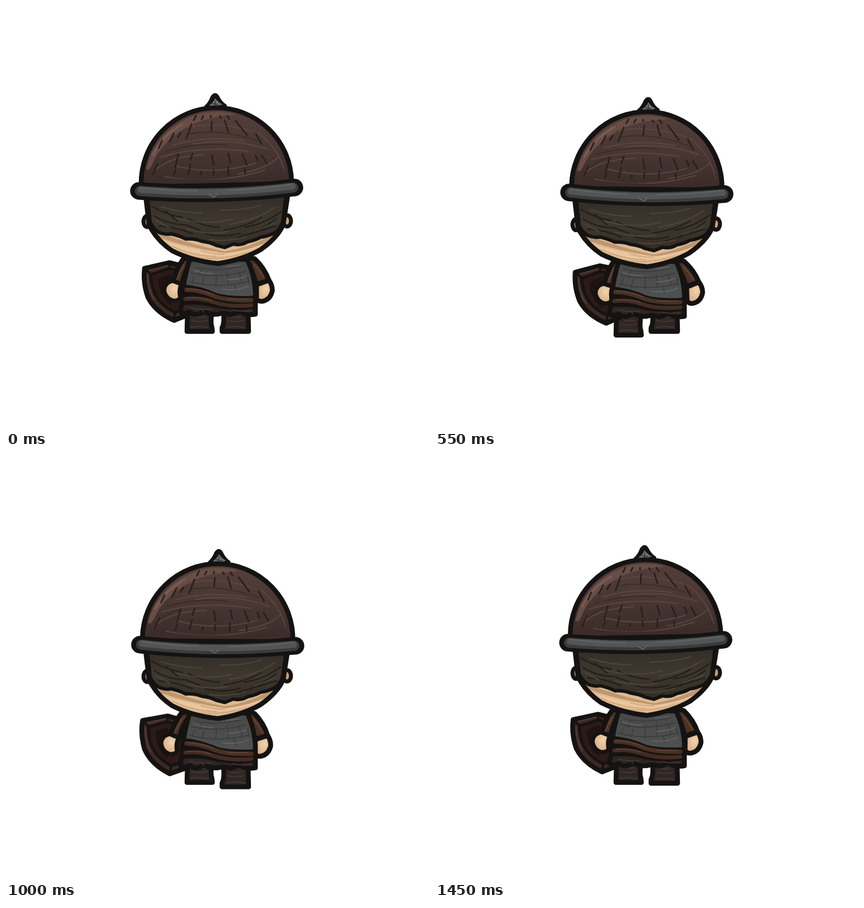
An HTML page for the animation above (1500 ms loop, 748x748 px).

```html
<!DOCTYPE html>
<html lang="en">
<head>
<meta charset="utf-8">
<title>Walking soldier, back view</title>
<style>
html, body { margin: 0; width: 100%; height: 100%; overflow: hidden; background: #fff; }
svg { display: block; width: 100vw; height: 100vh; }
.ink { stroke: #141312; stroke-width: 8.5; stroke-linejoin: round; stroke-linecap: round; }
.line { fill: none; stroke-linecap: round; stroke-linejoin: round; }
</style>
</head>
<body>
<svg viewBox="0 0 748 748">
<defs>
  <linearGradient id="leather" x2="0" y2="1">
    <stop stop-color="#553f3a"/><stop offset=".45" stop-color="#493733"/><stop offset="1" stop-color="#392b29"/>
  </linearGradient>
  <linearGradient id="steel" x2="0" y2="1">
    <stop stop-color="#484848"/><stop offset="1" stop-color="#505152"/>
  </linearGradient>
  <linearGradient id="hair" x2="0" y2="1">
    <stop stop-color="#302b26"/><stop offset=".5" stop-color="#3e372f"/><stop offset="1" stop-color="#332d26"/>
  </linearGradient>
  <radialGradient id="skin" cx=".6" cy=".4">
    <stop stop-color="#f2d3ae"/><stop offset="1" stop-color="#dbb28a"/>
  </radialGradient>
  <path id="dome" d="M239 320V315A133 133 0 0 1 505 311V314Z"/>
  <path id="skull" d="M247 336L253 387Q266 414 294 433Q330 451 375 455.500Q418 449 450 431Q480 410 490 387L499 330Z"/>
</defs>

<g id="leftLeg">
  <path class="ink" fill="#302725" d="M321 536L320 575.500H365L364 567Q361 560 365 536Z"/>
  <path class="line" stroke="#493a37" stroke-width="1.5" d="M328 556q14 4 28 0M327 568q16-3 30 1M335 550h18"/>
</g>
<g id="rightLeg">
  <path class="ink" fill="#302725" d="M384 536Q387 560 382 569V575.500H429L428 536Z"/>
  <path class="line" stroke="#493a37" stroke-width="1.5" d="M392 556q14 4 28 0M392 568q16-3 30 1M397 550h18"/>
</g>

<g id="leftArm">
  <path class="ink" fill="#3d2822" d="M245 464L289 454L322 462V546L297 556Q264 541 251 515Q242 490 245 464Z"/>
  <path class="line" stroke="#5a3c33" stroke-width="2" d="M251 468L286 459M250 476Q250 500 262 519"/>
  <path class="ink" style="stroke-width:5" fill="#2b1a18" d="M256 475L289 464L322 472V532L299 542Q271 528 262 506Q256 490 256 475Z"/>
  <path class="line" stroke="#141312" stroke-width="4" d="M246 464L257 475M289 454V464M299 542L297 555"/>
  <path fill="#20120f" d="M269 482L292 473V530Q270 514 269 482Z"/>
  <path class="ink" fill="#4a3125" d="M326 444L313 448Q302 463 296 486L311 493Q316 466 329 452Z"/>
  <path class="line" stroke="#654533" stroke-width="2" d="M314 458Q306 472 302 484"/>
  <path class="ink" style="stroke-width:7" fill="url(#skin)" d="M294 486Q279 490 280 504Q283 518 296 521Q306 521 308 515Q305 502 310 492Z"/>
</g>
<g id="rightArm">
  <path class="ink" fill="#4a3125" d="M424 444L440 447Q457 463 465 485L442 492Q437 467 424 454Z"/>
  <path class="line" stroke="#654533" stroke-width="2" d="M439 457Q450 470 456 481"/>
  <path class="ink" fill="url(#skin)" d="M443 493L465 485Q471 493 471 503Q468 519 454 522Q445 523 443 517Z"/>
</g>

<g id="body">
  <path class="ink" fill="#2e2523" d="M312 522L308 540Q313 546 325 541Q334 548 342 544L352 540Q359 546 374 545Q386 541 396 546Q407 543 414 540Q422 548 441 545V522Z"/>
  <path class="line" stroke="#443532" stroke-width="2" d="M324 533q20 5 38 3M348 537l1 4M402 538q16 3 30 1"/>
  <path class="ink" fill="url(#steel)" d="M325 448Q316 475 313 504L312 520H441V504Q438 470 426 448Z"/>
  <path class="line" stroke="#38393a" stroke-width="1.5" d="M328 472Q374 483 424 469M324 487Q374 501 430 487M334 462Q374 471 416 460M346 465l-4 11M372 476l-1 20M391 470l2 22M350 480l-3 14M412 470l5 18M333 478l-4 12M404 494l2 10M427 476l3 14"/>
  <path class="line" stroke="#666768" stroke-width="1.5" d="M332 467Q350 474 366 473M391 484Q412 484 426 477M383 501Q412 504 429 495M390 461l25-3"/>
  <path class="ink" style="stroke-width:4" fill="#141312" d="M312 494Q345 497 373 510Q400 517 441 514V533Q407 538 372 532Q346 524 311 527Z"/>
  <path class="line" stroke="#493024" stroke-width="7.5" d="M319 502Q344 502 370 514Q396 522 434 520"/>
  <path class="line" stroke="#422c22" stroke-width="7" d="M317 518Q344 515 368 524Q396 533 434 529"/>
  <path class="line" stroke="#654434" stroke-width="1.5" d="M320 500Q345 501 368 511M320 516Q344 514 364 521M392 518L428 518"/>
</g>

<g id="head">
  <g class="ink" style="stroke-width:7" fill="#c99b75">
    <ellipse cx="250" cy="381" rx="7" ry="10"/><ellipse cx="497" cy="380" rx="7" ry="10"/>
  </g>
  <use href="#skull" fill="#dfba91"/>
  <path fill="#eac79d" d="M282 417Q330 431 386 438Q430 434 468 413Q454 426 420 435Q375 450 330 437Q302 430 282 417Z"/>
  <path class="line" stroke="#cda179" stroke-width="1.5" d="M295 425Q330 442 372 443M325 443Q375 452 424 437M345 433Q365 439 386 439M420 430L448 422"/>
  <path fill="#bd9772" d="M264 398Q320 420 386 434Q432 428 480 399V409Q440 431 388 437Q320 427 270 409Z"/>
  <path class="ink" style="stroke-width:6" fill="url(#hair)" d="M250 336L255 383Q260 393 270 400Q282 405 292 403Q306 406 318 412Q333 411 346 416Q362 418 371 423L387 427L402 421Q416 424 427 417Q442 414 450 409Q464 407 477 400Q484 394 489 383L496 330Z"/>
  <path class="line" stroke="#231f1a" stroke-width="2.5" d="M258 354Q280 368 312 374M262 371Q285 386 318 387L342 396M270 389Q302 391 330 403M283 363L304 381M322 376Q352 391 378 391M352 402Q382 411 414 402M386 396Q425 390 452 374M408 410Q440 400 478 389M422 391Q456 386 486 364M432 404L458 389M452 394L478 376"/>
  <path class="line" stroke="#504738" stroke-width="1.8" d="M274 355Q310 366 346 366M300 375Q350 389 400 377M318 394Q360 406 392 399M396 386Q442 379 476 356M360 413Q390 418 424 408M440 398L474 384M266 380L290 393M380 361Q420 362 452 352"/>
  <use href="#skull" class="ink" fill="none"/>
</g>

<g id="helmet">
  <path class="ink" style="stroke-width:5" fill="#141312" d="M353 178Q360 172 364 161Q370 152 375 161Q380 171 388 176Z"/>
  <path fill="#6f7476" d="M370 163Q367 171 359 176Q371 179 383 174Q374 170 370 163Z"/>
  <path class="line" stroke="#303234" stroke-width="1.5" d="M370 168V176M365 173L376 174"/>
  <use href="#dome" fill="url(#leather)"/>
  <path fill="#674d45" d="M248 286Q266 216 340 191Q377 183 407 192Q342 196 306 223Q271 249 260 277Q252 296 248 286Z"/>
  <path class="line" stroke="#7b5e53" stroke-width="3" d="M260 263Q277 229 312 209"/>
  <path class="line" stroke="#5b4640" stroke-width="2" d="M315 216Q372 202 436 222M296 246Q352 228 420 238M330 244Q400 232 462 253M272 268Q340 246 428 257M264 290Q290 266 350 263M280 302Q370 318 458 290M410 297Q462 288 482 267M300 283Q370 300 442 278M446 224Q484 254 492 292"/>
  <path class="line" stroke="#3a2b28" stroke-width="1.8" d="M324 226Q378 216 444 238M280 258Q340 240 390 246M262 302Q330 312 402 306M410 310Q460 305 492 289M274 281Q280 270 304 263M450 307L492 300"/>
  <path class="line" stroke="#2a1f1d" stroke-width="2.8" d="M336 194l-4 8M349 194l-3 6M362 194v3M378 195l2 3M391 194l4 6M328 209l-9 25M364 205l-1 16M387 203l6 19M406 203l20 25M297 225l-8 15M309 224l-5 8M276 238l-6 13M442 227l10 17M305 262l-6 24M330 261l-4 11M364 264l3 17M393 261l4 16M418 262l8 19M441 264l4 9M268 279l-8 19M326 280l-4 18M367 289v9M393 285v14M422 287l1 10M452 264l9 14M300 290l-3 8M345 293v5"/>
  <use href="#dome" class="ink" fill="none"/>
  <g class="line">
    <path stroke="#141312" stroke-width="31" d="M235 327Q372 338 510 321"/>
    <path stroke="#3a3b3c" stroke-width="18" d="M237 327Q372 338 508 321"/>
    <path stroke="#535455" stroke-width="11" d="M238 325Q372 336 507 319"/>
    <path stroke="#626364" stroke-width="2" d="M237 321Q290 327 338 327M390 326Q450 324 505 315M358 333l10 5 6-6"/>
  </g>
</g>
</svg>
<script>
const LOOP = 1500, STEP = 50;
const place = (id, transform) => document.getElementById(id).setAttribute('transform', transform);
// 0 at the ends of the span, 1 halfway, linear between
const tri = p => 1 - Math.abs(2 * p - 1);

function draw(now) {
  const p = Math.floor(now % LOOP / STEP) * STEP / LOOP;
  const half = p * 2 % 1;
  const dip = tri(half);
  const swing = p < .5 ? dip : -dip;
  const tilt = 2.5 * tri(p);

  place('leftLeg', `translate(0 ${p < .5 ? 12 * dip : 0})`);
  place('rightLeg', `translate(0 ${p < .5 ? 0 : 11.5 * dip})`);
  place('leftArm', `translate(0 ${8 * dip}) rotate(${-3.7 * swing} 320 380)`);
  place('rightArm', `translate(0 ${9 * dip}) rotate(${-4 * swing} 425 440)`);
  place('body', `translate(0 ${7 * dip})`);
  place('head', `translate(0 ${10.5 * dip})`);
  place('helmet', `translate(0 ${13.3 * dip}) rotate(${tilt} 374 390)`);
  requestAnimationFrame(draw);
}
draw(0);
</script>
</body>
</html>
```
